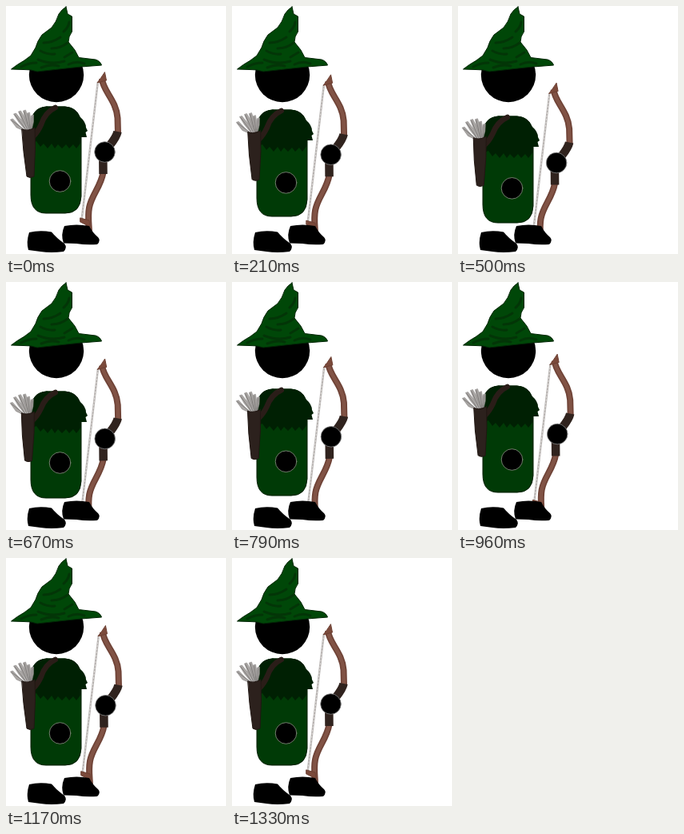
An HTML page for the animation above (1.54 s loop, 275 px wide and 310 px high).

```html
<!DOCTYPE html>
<html lang="en">
<head>
<meta charset="utf-8">
<title>Archer idle</title>
<style>
html, body { margin: 0; width: 100%; height: 100%; overflow: hidden; background: #fff; }
svg { display: block; width: 275px; height: 310px; }
</style>
</head>
<body>
<svg viewBox="0 0 275 310" fill="none" stroke-linecap="round" stroke-linejoin="round">
  <defs>
    <path id="limbs" d="M120 91 C121 106 138 118 139.5 140 L140 160 M121.5 208 C118.500 226 107 236 104 252 C102 263 103.500 271 104 282"/>
  </defs>
  <g id="bow">
    <path d="M114.700 96 L94.500 268" stroke="#b7b3b1" stroke-width="2.400"/>
    <path d="M114.700 96 L94.500 268" stroke="#dedad8" stroke-width="1.2" stroke-dasharray="1 3"/>
    <g stroke-linecap="butt">
      <use href="#limbs" stroke="#6f4337" stroke-width="8"/>
      <use href="#limbs" stroke="#815345" stroke-width="4.5"/>
      <path d="M139.500 157 C138 165 132 171 126 179 M121.300 190 L121.500 210" stroke="#30231e" stroke-width="10.5"/>
    </g>
    <path d="M123.500 83 L125.500 93 L114 96 L118.5 90 Z" fill="#7b4a3b" stroke="#6d4033"/>
    <path d="M93 265 L104 268 L105 276 L93 270 Z" fill="#7b4a3b" stroke="#6d4033"/>
    <circle cx="123.5" cy="182.5" r="12.8" fill="#000" stroke="#888" stroke-width=".8"/>
  </g>

  <g fill="#000">
    <path d="M29 283 Q42 280 57 282.500 Q63 290 73 297 Q77 302 72 307 Q56 309 43 307 L28 305 Q25 295 29 283 Z"/>
    <path d="M73 275 Q88 272 104 275 Q108 283 115 289 Q119 293 114 298 Q100 299 88 297 L72 296.500 Q68 286 73 275 Z"/>
  </g>

  <g id="body">
    <path d="M51 126 H73 Q94 127 94 151 V238 Q93 259 74 259 H50 Q31 259 31 236 V149 Q32 127 51 126 Z" fill="#003a06" stroke="#011c03"/>
    <path d="M50 125.500 H74 Q88 127 92 138 Q100 145 100 152 L102 156 L99.500 158 L101 164 L94 164 L93.500 171 L88 178 L84 173 L79 178 L75 173 L70 178 L65 173 L61 178 L57 172 L52 178 L47 172 L43 176 L38 169 L31 172 V148 Q32 127 50 125.500 Z" fill="#002003"/>
  </g>

  <g id="quiver">
    <path d="M61.500 127 C53 131 47 139 44 148 Q40 157 34 163" stroke="#2a1d18" stroke-width="6.8"/>
    <g id="arrows"></g>
    <path d="M20 154 Q28 157 36 152 L36.500 178 L35 213 Q30 216 26 213 L22 182 Z" fill="#2c211d" stroke="#211713"/>
  </g>

  <circle id="hand" cx="67.500" cy="219" r="13.300" fill="#000" stroke="#7d8b78" stroke-width=".9"/>

  <circle cx="63" cy="86" r="34.200" fill="#000"/>
  <path d="M75 1 L77 10 L82.500 13 V32 Q78 38 78 45 L86 55 L91 64.500 L112 67 Q118 69 119.500 74 L94 76 L66 79 L39 82 Q31 79 22 79.500 L6.500 79 Q14 73 23 68 L31 62 L37 52 Q39 44 45 36 L57 27 Q63 20 66 10 Q70 4 75 1 Z" fill="#004708" stroke="#022506" stroke-width="1"/>
  <g stroke="#033507" stroke-width="3">
    <path d="M79 20 Q78 27 72 32 M47 46 Q58 46 68 39 M77 46 Q68 53 57 53 M43 56 Q52 61 61 60 M83 58 L73 64"/>
    <path d="M19 76 Q28 71 38 71 M40 67 Q57 74 73 69 M44 77 Q56 72 66 75 M78 73 Q88 68 98 72"/>
  </g>
</svg>
<script>
const LOOP = 1540;
const el = id => document.getElementById(id);

// Fletching fans out of the quiver mouth.
const tips = [[7, 141], [11, 134], [17, 131], [23, 130], [28, 133], [33, 136]];
const feather = ([x, y]) => {
  const bx = 25 + (x - 7) * 0.25;
  const mx = x + (bx - x) * 0.45;
  return `<path d="M${bx} 157 L${mx - 2} ${y + 11} L${x - 1.5} ${y + 1} L${x + 1.5} ${y} L${mx + 2} ${y + 9} Z" fill="#aaa7a5" stroke="#8b8886" stroke-width=".6"/>` +
    `<path d="M${bx} 156 L${x} ${y + 2}" stroke="#6f6c6a" stroke-width=".7"/>`;
};
el("arrows").innerHTML = tips.map(feather).join("");

// Pose starts: a rest, then two thirteen-pose sways and a short settle.
const starts = [0];
for (let i = 1, at = 130; i <= 30; i++) {
  starts.push(at);
  const n = (i - 1) % 13 + 1;
  const slow = i <= 13 ? n === 6 || n === 11 : i <= 26 && (n === 5 || n === 10);
  at += slow ? 50 : 40;
}

const keys = [0, 6, 10, 13, 14, 21, 26, 30];
const moves = {
  body: [0, 8, 12, 12, 11, 4, 0, 0],
  hand: [0, 3.8, 8.8, 8, 7, 3, 0, 0],
  bowX: [0, 0.2, -0.4, 0, 0.2, 0.7, 1, 0],
  bowY: [0, 6.5, 13.5, 14, 13.4, 7.5, 1.8, 0]
};

function valueAt(name, pose) {
  const v = moves[name];
  let k = 0;
  while (k < keys.length - 2 && pose > keys[k + 1]) k++;
  const u = (pose - keys[k]) / (keys[k + 1] - keys[k]);
  return v[k] + (v[k + 1] - v[k]) * u;
}

function draw(time) {
  let pose = starts.length - 1;
  while (starts[pose] > time) pose--;
  const y = valueAt("body", pose);
  const place = (id, value) => el(id).setAttribute("transform", value);
  place("body", `translate(0 ${y})`);
  place("quiver", `translate(0 ${y}) rotate(${y * 0.16} 60 130)`);
  place("hand", `translate(0 ${valueAt("hand", pose)})`);
  place("bow", `translate(${valueAt("bowX", pose)} ${valueAt("bowY", pose)})`);
}

const begin = performance.now();
function tick() {
  draw((performance.now() - begin) % LOOP);
  requestAnimationFrame(tick);
}
draw(0);
requestAnimationFrame(tick);
</script>
</body>
</html>
```
